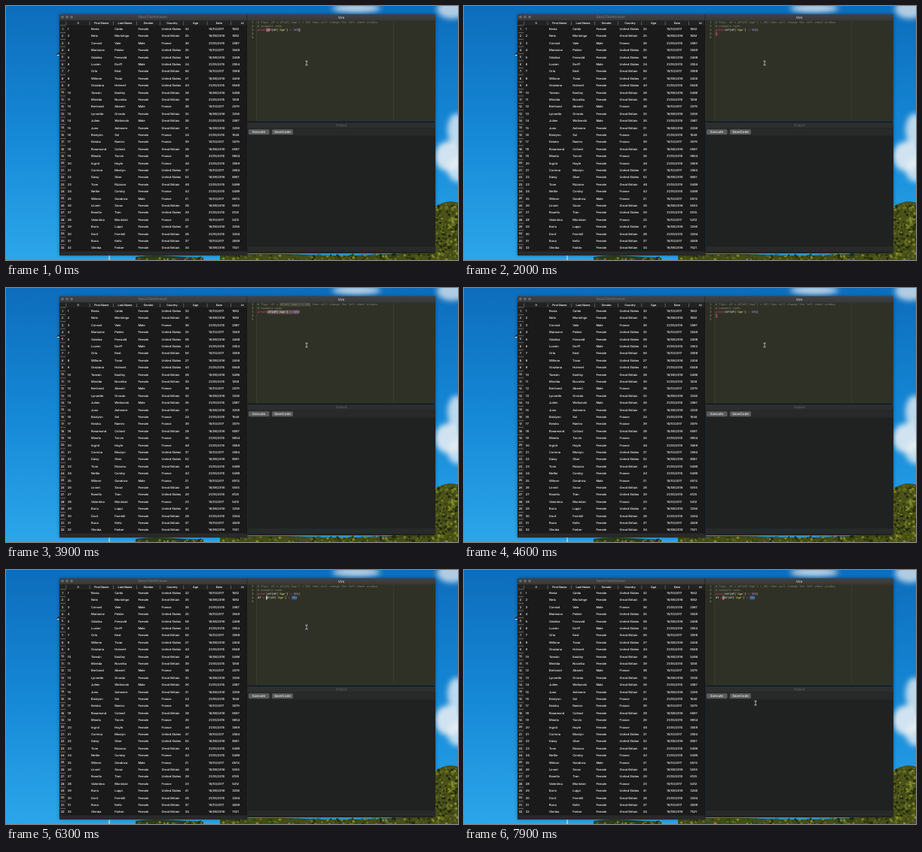
Animation of 600x338 px, one loop 8000 ms. Source, as an HTML page:

```html
<!DOCTYPE html>
<html lang="en">
<head>
<meta charset="utf-8">
<title>Sheet and editor</title>
<style>
html, body { margin: 0; width: 100%; height: 100%; overflow: hidden; background: #1673bd; }
svg { display: block; width: 600px; height: 338px; }
text { white-space: pre; text-rendering: geometricPrecision; }
.ui { font-family: Inter, sans-serif; font-weight: 500; }
.code { font: 3.77px "DejaVu Sans Mono", monospace; }
</style>
</head>
<body>
<svg id="stage" viewBox="0 0 600 338" xmlns="http://www.w3.org/2000/svg">
  <defs>
    <linearGradient id="sky" x1="0" y1="0" x2="0" y2="1">
      <stop offset="0" stop-color="#0d6dbc"/>
      <stop offset=".5" stop-color="#1588d6"/>
      <stop offset="1" stop-color="#2ca6ea"/>
    </linearGradient>
    <linearGradient id="bar" x1="0" y1="0" x2="0" y2="1">
      <stop offset="0" stop-color="#414243"/>
      <stop offset="1" stop-color="#363738"/>
    </linearGradient>
    <filter id="soft" x="-50%" y="-50%" width="200%" height="200%"><feGaussianBlur stdDeviation="3.5"/></filter>
    <filter id="shade"><feGaussianBlur stdDeviation="2"/></filter>
  </defs>
  <rect width="600" height="338" fill="url(#sky)"/>
  <g id="clouds" fill="#e6edf2" filter="url(#soft)"></g>
  <g id="trees"></g>
  <path d="M74 11H567Q570 11 570 14V329H320V332H71V14Q71 11 74 11Z" opacity=".4" filter="url(#shade)"/>
  <path d="M66.500 66l3-4 2 .5V65z" fill="#18222a"/>
  <path d="M67 65.500l3-1 1 .8-2 1z" fill="#e8eef2"/>
  <g id="sheet" class="ui"></g>
  <g id="editor"></g>
  <g id="marks"></g>
  <g id="source" class="code"></g>
  <g id="output" class="ui"></g>
  <g id="mouse" fill="none" stroke-linecap="round">
    <path d="M-1.300-3Q0-3 0-2Q0-3 1.300-3M0-2V2M-1.300 3Q0 3 0 2Q0 3 1.300 3" stroke="#101010" stroke-width="1.500"/>
    <path d="M-1.300-3Q0-3 0-2Q0-3 1.300-3M0-2V2M-1.300 3Q0 3 0 2Q0 3 1.300 3" stroke="#f2f2f2" stroke-width=".8"/>
  </g>
</svg>
<script>
const LOOP = 8000, TICK = 100;
const CODE_X = 334, CHAR = 2.27, LINE_Y = 22, LINE_H = 5;
const $ = id => document.getElementById(id);
const esc = s => s.replace(/&/g, '&amp;').replace(/</g, '&lt;').replace(/>/g, '&gt;');
const rect = (x, y, w, h, fill, extra = '') =>
  `<rect x="${x}" y="${y}" width="${w}" height="${h}" fill="${fill}" ${extra}/>`;
const label = (x, y, s, fill, size, anchor = 'start', extra = '') =>
  `<text x="${x}" y="${y + size * 0.36}" fill="${fill}" font-size="${size}" text-anchor="${anchor}" ${extra}>${esc(s)}</text>`;

function random(seed) {
  return () => (seed = (seed * 16807) % 2147483647) / 2147483647;
}

// Landscape
function drawLandscape() {
  const blob = (x, y, rx, ry, o) => `<ellipse cx="${x}" cy="${y}" rx="${rx}" ry="${ry}" opacity="${o}"/>`;
  $('clouds').innerHTML =
    blob(465, 3, 32, 6, .8) + blob(592, 4, 20, 13, .75) +
    blob(598, 165, 12, 22, .8) + blob(588, 200, 19, 20, .9) + blob(600, 218, 14, 16, .8);
  const rnd = random(71);
  const greens = ['#23290f', '#454d16', '#66701f', '#858a2b', '#363e14'];
  const leaf = (x, y, r) =>
    `<circle cx="${x.toFixed(1)}" cy="${y.toFixed(1)}" r="${r.toFixed(1)}" fill="${greens[rnd() * 5 | 0]}"/>`;
  let out = '<path d="M535 338V300Q560 270 574 265Q588 257 600 262V338Z" fill="#4b531a"/>' +
    '<path d="M172 338V334Q190 331 215 332.500T262 335V338Z" fill="#2f3d1a"/>' +
    '<path d="M284 338V332Q340 328 400 331T540 328V338Z" fill="#454d18"/>';
  for (let i = 0; i < 260; i++) {
    const x = 566 + rnd() * 34;
    out += leaf(x, 262 + (600 - x) * .12 + rnd() * 76, .7 + rnd() * 1.600);
  }
  for (let i = 0; i < 200; i++) out += leaf(284 + rnd() * 290, 330.500 + rnd() * 8, .6 + rnd() * 1.300);
  for (let i = 0; i < 50; i++) out += leaf(174 + rnd() * 86, 334.500 + rnd() * 4, .6 + rnd());
  $('trees').innerHTML = out + rect(136.500, 331, 1.200, 7, '#dfe6ea');
}

// Table: first name, last name, gender, country, age, date, id
const PEOPLE = `Renia Caldo F U 32 a 1562
Nela Morishige F G 25 b 1582
Conrad Vale M F 36 c 2587
Marianne Pelder F U 25 a 3549
Odalina Fenwold F U 58 b 2468
Lucien Dorff M U 24 c 2554
Orla Kest F G 56 a 3598
Willene Tovar F U 27 b 2456
Graziana Holmert F U 40 c 6548
Tamsin Eastley F G 28 b 5486
Mirelda Novotka F G 39 c 1258
Bertrand Absent M F 38 a 2579
Lynnette Orvedo F G 32 b 3256
Julien Wolbrecki M G 26 c 2587
Juno Ashmere F G 31 b 3259
Brialynn Sol F F 24 c 1546
Keisha Ramiro F F 39 a 3579
Rosamund Collard F G 28 b 6597
Minela Tarvin F F 26 c 9654
Ingrid Hayle F F 46 c 3569
Corinna Mostyn F U 37 a 2564
Daisy Ober F U 52 b 8561
Tove Rizzano F G 46 c 5489
Nettie Corsby F F 42 c 5489
Wilmer Gandrow M F 21 a 6574
Linnet Snow F G 28 b 5555
Rosella Tran F U 29 c 6125
Valentina Montclair F F 23 a 5412
Boris Luppi F U 41 b 3256
Dorit Fernhill F G 28 c 3264
Runa Keltz F G 37 a 4569
Olenka Farber F G 34 b 7521`;
const COUNTRY = { U: 'United States', G: 'Great Britain', F: 'France' };
const DATE = { a: '15/10/2017', b: '16/08/2016', c: '21/05/2015' };
const HEADS = ['0', 'First Name', 'Last Name', 'Gender', 'Country', 'Age', 'Date', 'Id'];

function drawSheet() {
  const col = i => 80 + i * 31.2, line = '#98999a';
  let out = '<path d="M71 332V14Q71 11 74 11H320V332Z" fill="#1a1a1a"/>' +
    '<path d="M71 19.500V14Q71 11 74 11H320V19.500Z" fill="url(#bar)"/>' +
    rect(71, 19.500, 249, 6.500, '#222223') + rect(71, 26, 8.800, 300, '#222223') +
    rect(71, 326.500, 249, 5.500, '#28292a');
  for (let i = 0; i < 3; i++) out += `<circle cx="${75 + i * 6}" cy="14.700" r="1.900" fill="#66686b"/>`;
  out += label(195, 14.800, 'BasicTableViewer', '#77787a', 4.600, 'middle');
  HEADS.forEach((head, i) => {
    out += label(col(i) + 15.600, 22.800, head, '#f0f0f0', 3.700, 'middle', 'font-weight="600"');
    out += rect(col(i) - .4, 20.500, .5, 5, line);
  });
  PEOPLE.split('\n').forEach((entry, row) => {
    const [first, last, sex, land, age, date, id] = entry.split(' ');
    const y = 30.500 + row * 9.400, n = String(row + 1);
    const cells = [n, first, last, sex === 'F' ? 'Female' : 'Male', COUNTRY[land], age, DATE[date], id];
    out += label(75, y, n, '#f0f0f0', 3.700, 'middle', 'font-weight="600"') +
      rect(72, y - 4.900, 7, .5, line);
    cells.forEach((cell, i) => out += label(col(i) + 1.800, y, cell, '#ffffff', 4));
  });
  $('sheet').innerHTML = out + rect(319.700, 11, .6, 320, '#0c0d0e');
}

function drawPanels() {
  let out = '<path d="M320.300 153.500V11H567Q570 11 570 14V150.500Q570 153.500 567 153.500Z" fill="#2f3126"/>' +
    '<path d="M320.300 19.500V11H567Q570 11 570 14V19.500Z" fill="url(#bar)"/>' +
    label(445, 15, 'Vim', '#d4d5d6', 4.600, 'middle', 'class="ui"') +
    rect(320.300, 19.500, 12, 134, '#2c2e24') + rect(332.200, 19.500, .4, 134, '#4c4e41') +
    rect(514, 19.500, .5, 134, '#45473a');
  for (let i = 0; i < 5; i++)
    out += label(328.500, LINE_Y + i * LINE_H, String(i + 1), '#a2a295', 3.770, 'end', 'class="code"');
  $('editor').innerHTML = out;

  const button = (x, w, s) => rect(x, 164.300, w, 6.700, '#5b5c5d', 'rx="1.400"') +
    label(x + w / 2, 167.600, s, '#f2f2f2', 4.400, 'middle');
  $('output').innerHTML =
    '<path d="M320.300 329V155H567Q570 155 570 158V326Q570 329 567 329Z" fill="#202121"/>' +
    '<path d="M320.300 162.500V155H567Q570 155 570 158V162.500Z" fill="#2d2e2e"/>' +
    rect(320.300, 162.500, 249.700, 10, '#282929') + rect(320.300, 320, 249.700, 7, '#282929') +
    rect(320.300, 153.600, 249.700, 1.300, '#101111') +
    label(445, 158.600, 'Output', '#626364', 4.400, 'middle') +
    button(322, 27.500, 'Execute') + button(353, 28, 'SaveCode');
}

// Editor
const FILTER = "df[df['Age'] > 50]";
const TIP = `# Tips: df = ${FILTER} then will change the left sheet window`;
const LINES = [TIP, '# example code:', `print(${FILTER})`];
const PINK = '#94465a', GREY = '#65525a', LIGHT = '#a98590', BLUE = '#235f83';

// time, cursor line, first column, width, colour, text typed on line 4
const STEPS = [
  [0, 3, 5, 2, PINK, ''],
  [600, 3, 6, 1, PINK, ''],
  [1100, 3, 0, 1, PINK, ''],
  [1500, 4, 0, 1, PINK, ''],
  [2200, 3, 0, 1, PINK, ''],
  [2500, 3, 5, 1, PINK, ''],
  [2700, 3, 6, 2, LIGHT, ''],
  [3000, 3, 6, 3, GREY, ''],
  [3400, 3, 6, 6, GREY, ''],
  [3600, 3, 6, 14, GREY, ''],
  [3900, 3, 6, 18, GREY, ''],
  [4200, 3, 6, 1, PINK, ''],
  [4500, 4, 0, 1, PINK, ''],
  [5000, 4, 17, 1, PINK, FILTER],
  [5300, 4, 18, 1, PINK, FILTER],
  [5500, 4, 0, 1, LIGHT, FILTER],
  [5700, 4, 1, 1, LIGHT, 'd' + FILTER],
  [5800, 4, 2, 1, LIGHT, 'df' + FILTER],
  [5900, 4, 3, 1, LIGHT, 'df ' + FILTER],
  [6000, 4, 4, 1, LIGHT, 'df =' + FILTER],
  [6100, 4, 5, .6, '#e2e2dc', 'df = ' + FILTER],
  [6600, 4, 4, 1, LIGHT, 'df = ' + FILTER]
];

function paint(line) {
  if (line[0] === '#') return [[line, '#858472']];
  const tint = s => s === 'print' ? '#f0407f' : s[0] === "'" ? '#e6db74' :
    /^\d/.test(s) ? '#b58cff' : /[>=]/.test(s) ? '#f0407f' : '#f8f8f2';
  return (line.match(/print|'\w+'|\d+|[>=]|[^'\d>=]+/g) || []).map(s => [s, tint(s)]);
}

function drawCode([, line, start, width, color, typed]) {
  const mark = (row, from, n, fill) =>
    rect(CODE_X + from * CHAR, LINE_Y + (row - 1) * LINE_H - 2.500, n * CHAR, LINE_H, fill);
  let marks = mark(line, start, width, color);
  if (line === 3 && start === 5) marks += mark(3, 24, 1, GREY);
  if (line === 3 && width === 18) marks += mark(1, 13, 18, '#45463a');
  if (typed && start === 18) marks += mark(4, 17, 1, GREY);
  if (typed.startsWith('df = ')) marks += mark(4, 20, 2.600, BLUE);
  $('marks').innerHTML = marks;
  $('source').innerHTML = [...LINES, typed].map((text, row) => {
    let col = 0;
    return paint(text).map(([s, fill]) => {
      const out = label(CODE_X + col * CHAR, LINE_Y + row * LINE_H, s, fill, 3.770);
      col += s.length;
      return out;
    }).join('');
  }).join('');
}

// Pointer glides down to the output panel
function pointer(t) {
  if (t >= 7900) return [387, 177];
  const p = Math.min(1, Math.max(0, (t - 6800) / 900));
  const e = p * p * (3 - 2 * p);
  return [399 - 11 * e, 76 + 91 * e];
}

let shown = null;
function frame(now) {
  const t = Math.floor((now % LOOP) / TICK) * TICK;
  const step = STEPS.filter(s => s[0] <= t).pop();
  if (step !== shown) drawCode(shown = step);
  $('mouse').setAttribute('transform', `translate(${pointer(t)})`);
  requestAnimationFrame(() => frame(performance.now() - began));
}

drawLandscape();
drawSheet();
drawPanels();
const began = performance.now();
frame(0);
</script>
</body>
</html>
```
